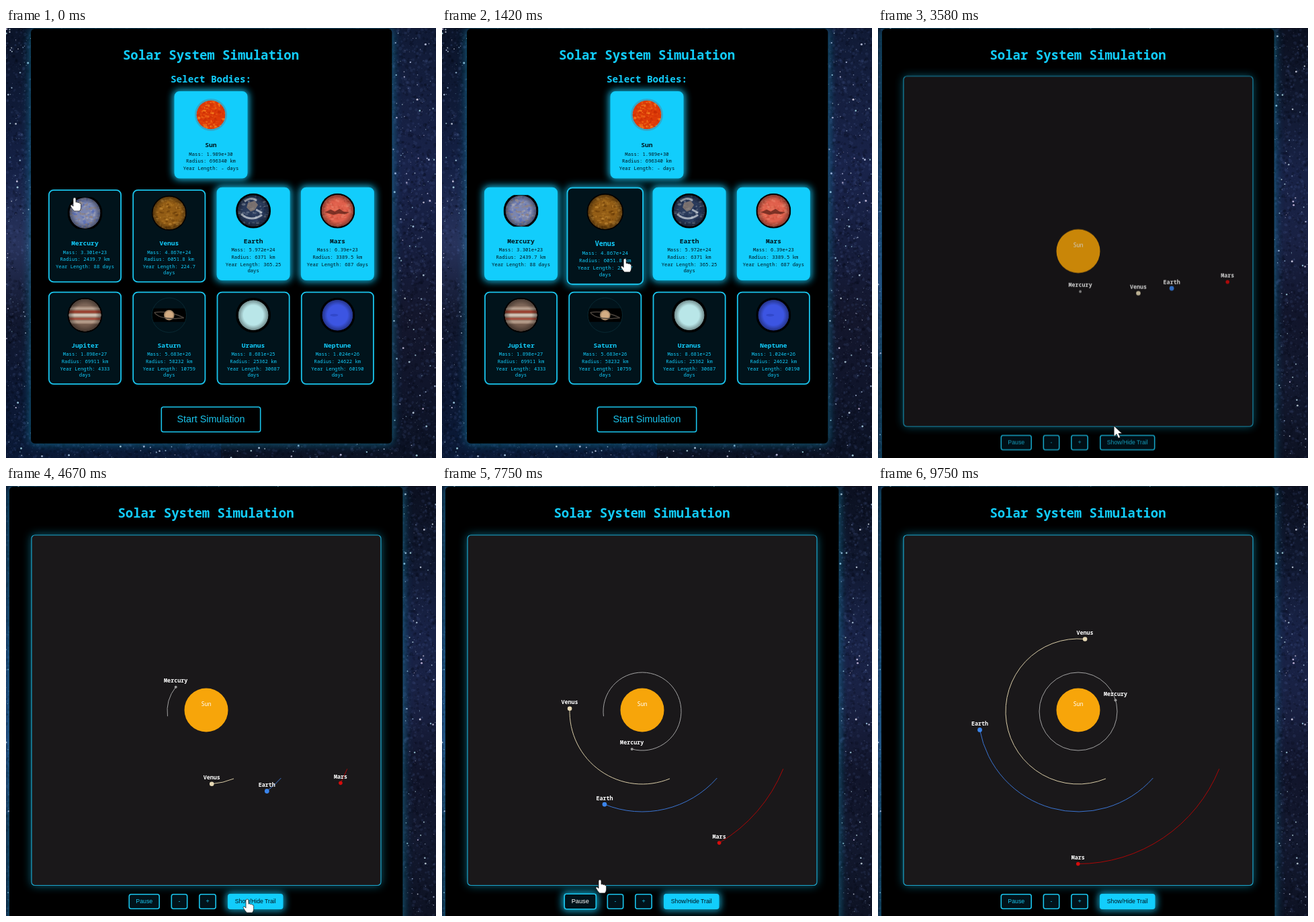
Animation of 640x639 px, one loop 9830 ms. Source, as an HTML page with a canvas:

```html
<!DOCTYPE html>
<html lang="en">
<head>
<meta charset="utf-8">
<title>Solar System Simulation</title>
<style>
html, body { margin: 0; width: 100%; height: 100%; overflow: hidden; background: #000; }
canvas, svg { position: absolute; left: 0; top: 0; width: 640px; height: 639px; display: block; }
text { font-family: 'Noto Sans Mono', 'DejaVu Sans Mono', monospace; text-anchor: middle; }
.b { font-weight: 700; }
.ui { font-family: 'Liberation Sans', Arial, sans-serif; }
</style>
</head>
<body>
<canvas id="skyA" width="640" height="639"></canvas>
<canvas id="skyB" width="640" height="639"></canvas>
<svg id="stage" viewBox="0 0 640 639">
  <defs>
    <filter id="glow" x="-30%" y="-80%" width="160%" height="260%"><feGaussianBlur stdDeviation="5.5"/></filter>
    <filter id="halo" x="-10%" y="-10%" width="120%" height="120%"><feGaussianBlur stdDeviation="7"/></filter>
    <filter id="soft"><feGaussianBlur stdDeviation=".4"/></filter>
    <radialGradient id="shade">
      <stop offset=".65" stop-color="#000" stop-opacity="0"/>
      <stop offset="1" stop-color="#000" stop-opacity=".4"/>
    </radialGradient>
  </defs>
</svg>
<script>
const LOOP = 9830, FPS = 12, CUT = 2870, TRAIL = 4290;
const CYAN = '#12cdfc', LINE = '#1ac4ec', DARK = '#01131b', INK = '#00141c';
const svg = document.getElementById('stage');
const clamp = v => Math.max(0, Math.min(1, v));

function el(parent, tag, attrs = {}, text) {
  const e = document.createElementNS('http://www.w3.org/2000/svg', tag);
  set(e, attrs);
  if (text !== undefined) e.textContent = text;
  parent.appendChild(e);
  return e;
}
function set(e, attrs) { for (const k in attrs) e.setAttribute(k, attrs[k]); }
function label(parent, x, mid, size, text, attrs = {}) {
  return el(parent, 'text', { x, y: mid + size * .35, 'font-size': size, fill: CYAN, ...attrs }, text);
}
function rng(s) {
  return () => {
    s = (s + 0x6D2B79F5) | 0;
    let r = Math.imul(s ^ (s >>> 15), 1 | s);
    r = (r + Math.imul(r ^ (r >>> 7), 61 | r)) ^ r;
    return ((r ^ (r >>> 14)) >>> 0) / 4294967296;
  };
}
function mix(a, b, k) {
  const part = (c, i) => parseInt(c.slice(i, i + 2), 16);
  return 'rgb(' + [1, 3, 5].map(i => Math.round(part(a, i) + (part(b, i) - part(a, i)) * k)) + ')';
}
// Linear interpolation through rows of [time, values...]
function track(keys, t) {
  let i = 1;
  while (i < keys.length - 1 && keys[i][0] < t) i++;
  const a = keys[i - 1], b = keys[i], k = clamp((t - a[0]) / (b[0] - a[0]));
  return a.slice(1).map((v, j) => v + (b[j + 1] - v) * k);
}

// ---- starry sky ----
function sky(id, seed, left, right) {
  const cv = document.getElementById(id), c = cv.getContext('2d'), rand = rng(seed);
  [[left, 0], [right, 320]].forEach(([cols, x]) => {
    const g = c.createLinearGradient(0, 0, 0, 639);
    cols.forEach((col, i) => g.addColorStop(i / (cols.length - 1), col));
    c.fillStyle = g;
    c.fillRect(x, 0, 320, 639);
  });
  for (let i = 0; i < 14000; i++) {
    c.fillStyle = rand() < .55 ? 'rgba(0,4,16,.2)' : 'rgba(90,115,175,.13)';
    c.beginPath();
    c.arc(rand() * 640, rand() * 639, .8 + rand() * 1.8, 0, 7);
    c.fill();
  }
  for (let i = 0; i < 13000; i++) {
    const m = rand(), s = .45 + m ** 25 * 1.1;
    c.fillStyle = `rgba(${170 + rand() * 60 | 0},${200 + rand() * 35 | 0},240,${.08 + m ** 6 * .75})`;
    c.beginPath();
    c.arc(rand() * 640, rand() * 639, s, 0, 7);
    c.fill();
  }
  return cv;
}
const skyA = sky('skyA', 11,
  ['#0b1429', '#0f1a36', '#152146', '#28335c', '#12182f', '#0c1732', '#0a1936'],
  ['#101a35', '#151f40', '#19234a', '#161e3f', '#13162c', '#10152b', '#0b1224']);
const skyB = sky('skyB', 29,
  ['#0c1830', '#14203c', '#1a2e5a', '#24386a', '#14203c', '#0e1a34'],
  ['#0b1020', '#10182f', '#182246', '#192143', '#11152b', '#12182e', '#0d1223']);

// ---- shared parts ----
function frame(parent, o, r, border) {
  const box = { x: o.x + border / 2, y: o.y + border / 2, width: o.w - border, height: o.h - border, rx: r };
  o.glow = el(parent, 'rect', { x: o.x - 2, y: o.y - 2, width: o.w + 4, height: o.h + 4, rx: r + 2,
    fill: CYAN, filter: 'url(#glow)' });
  o.box = el(parent, 'rect', { ...box, stroke: LINE, 'stroke-width': border });
}
function grow(o, k, dy = 0) {
  const cx = o.x + o.w / 2, cy = o.y + o.h / 2;
  o.g.setAttribute('transform', `translate(${cx} ${cy + dy}) scale(${k}) translate(${-cx} ${-cy})`);
}
function panel(parent) {
  const halo = el(parent, 'rect', { fill: '#12b4dc', opacity: .55, filter: 'url(#halo)', rx: 6 });
  const body = el(parent, 'rect', { fill: '#000', rx: 6 });
  return (x, y, width, height) => [halo, body].forEach(e => set(e, { x, y, width, height }));
}
function button(parent, x, y, w, h, text, size, scene, fill) {
  const o = { x, y, w, h, scene, fill, g: el(parent, 'g') };
  frame(o.g, o, 3, 1.6);
  o.text = label(o.g, x + w / 2, y + h / 2 - .3, size, text, { class: 'ui' });
  return o;
}
function paintButton(o, hover, on = 0) {
  set(o.box, { fill: on ? mix(DARK, CYAN, on) : mix(o.fill, DARK, hover), stroke: mix(LINE, CYAN, on) });
  o.glow.setAttribute('opacity', Math.max(hover, on) * .8);
  o.text.setAttribute('fill', on ? mix(CYAN, INK, on) : mix(LINE, '#ffffff', hover));
  grow(o, 1 + .05 * hover * (1 - on));
}

// ---- selection page ----
const menu = el(svg, 'g');
panel(menu)(37, 1, 537.5, 616.5);
label(menu, 305, 40.5, 19, 'Solar System Simulation', { class: 'b' });
label(menu, 305, 76, 14.3, 'Select Bodies:', { class: 'b' });

// name, mass, radius, year, disc radius, image height, base colour, spot colours, selection time
const bodies = [
  ['Sun', '1.989e+30', '696340', '- days', 21.5, 0, '#dc3a08', ['#ff9c2a', '#c42a04', '#f05a10'], -999],
  ['Mercury', '3.301e+23', '2439.7', '88 days', 23, 47, '#7b86b0', ['#b0aeb4', '#4c65b8', '#98806a'], 600],
  ['Venus', '4.867e+24', '6051.8', '224.7 days', 24.5, 52, '#925c15', ['#c98f38', '#643806', '#a8701d'], 1700],
  ['Earth', '5.972e+24', '6371', '365.25 days', 23.5, 52, '#2a3a5a', ['#8793a4', '#35486c', '#17274a'], -999],
  ['Mars', '6.39e+23', '3389.5', '687 days', 24, 52, '#e0604c', ['#ee8b72', '#c24a36', '#e9765c'], -999],
  ['Jupiter', '1.898e+27', '69911', '4333 days', 24, 52, '#a08675', null, 1e9],
  ['Saturn', '5.683e+26', '58232', '10759 days', 8, 20, '#d3ac83', null, 1e9],
  ['Uranus', '8.681e+25', '25362', '30687 days', 22.5, 52, '#b9e6e8', null, 1e9],
  ['Neptune', '1.024e+26', '24622', '60190 days', 23, 52, '#3c55e2', null, 1e9]
];

function portrait(g, i, cx, cy) {
  const [name, , , , r, h, base, spots] = bodies[i], rand = rng(i * 97 + 5);
  const clip = (id, rad) => el(el(svg.querySelector('defs'), 'clipPath', { id }), 'circle', { cx, cy, r: rad });
  clip('img' + i, 26);
  clip('disc' + i, r);
  if (h) el(g, 'rect', { x: cx - 26, y: cy - h / 2, width: 52, height: h, 'clip-path': `url(#img${i})` });
  else el(g, 'circle', { cx, cy, r: 24, fill: '#4e8ea6', opacity: .6, filter: 'url(#soft)' });
  const ring = (attrs) => el(g, 'path', { fill: 'none', stroke: '#4a423b', 'stroke-width': 1.5, ...attrs });
  if (name === 'Saturn') {
    el(g, 'circle', { cx, cy, r: 25.7, fill: 'none', stroke: '#0b2c36', 'stroke-width': .9 });
    ring({ d: `M${cx - 22} ${cy - 4}Q${cx} ${cy - 7} ${cx + 22} ${cy + 4}` });
  }
  const disc = el(g, 'g', { 'clip-path': `url(#disc${i})` });
  el(disc, 'circle', { cx, cy, r, fill: base });
  const art = el(disc, 'g', { filter: 'url(#soft)' });
  if (spots) for (let k = 0; k < 150; k++) {
    const a = rand() * 6.283, d = r * Math.sqrt(rand());
    el(art, 'ellipse', { cx: cx + d * Math.cos(a), cy: cy + d * Math.sin(a), rx: .6 + rand() * 2.4, ry: .5 + rand() * 1.5,
      fill: spots[k % 3], opacity: .25 + rand() * .4 });
  }
  const band = (y, hh, fill) => el(art, 'rect', { x: cx - 26, y: cy + y, width: 52, height: hh, fill });
  if (name === 'Jupiter') {
    band(-24, 11, '#7d6557'); band(-11, 2, '#b9a494'); band(-7, 4, '#9a4433');
    band(-2, 4, '#d0c0b2'); band(4, 3, '#a3503f'); band(9, 2, '#b9a18f'); band(13, 12, '#735a4c');
  }
  if (name === 'Mars') el(art, 'path', { d: `M${cx - 19} ${cy + 2}l9-4 6 3 7-4 6 4 9 1-7 3-9-1-8 2z`, fill: '#5e2218', opacity: .75 });
  if (name === 'Earth') {
    el(art, 'path', { d: `M${cx - 8} ${cy - 12}l10-3 5 6-5 8-6 2-6-6z`, fill: '#9a8877', opacity: .7 });
    el(art, 'path', { d: `M${cx - 18} ${cy + 5}q14 12 31 1M${cx - 13} ${cy - 14}q10-8 18-1M${cx + 4} ${cy - 2}l9 5`,
      fill: 'none', stroke: '#e4e8ec', 'stroke-width': 3, opacity: .65 });
  }
  if (name === 'Neptune') el(art, 'ellipse', { cx: cx - 5, cy, rx: 6, ry: 2, fill: '#2a40bc', opacity: .6 });
  if (i) el(g, 'circle', { cx, cy, r, fill: 'url(#shade)' });
  if (name === 'Saturn') ring({ d: `M${cx - 22} ${cy - 4}Q${cx - 14} ${cy + 8} ${cx + 22} ${cy + 4}` });
}

const cards = bodies.map((b, i) => {
  const col = (i - 1) % 4;
  const o = { x: i ? 63 + 125.3 * col : 250.5, y: i ? (i < 5 ? 240 : 391.7) : 97.3,
    w: 109, h: i ? 138.3 : 129.5, scene: 0, at: b[8], g: el(menu, 'g') };
  frame(o.g, o, 7, 1.8);
  const cx = o.x + o.w / 2;
  portrait(o.g, i, cx, o.y + 35);
  o.info = el(o.g, 'g');
  const line = (dy, text, size = 7.25, attrs = {}) =>
    label(o.info, cx, o.y + dy, size, text, attrs).removeAttribute('fill');
  line(80, b[0], 9.6, { class: 'b' });
  line(93, 'Mass: ' + b[1]);
  line(103.6, `Radius: ${b[2]} km`);
  const year = 'Year Length: ' + b[3];
  if (year.length < 22) line(114.3, year);
  else { line(114.3, year.replace(' days', '')); line(123.6, 'days'); }
  return o;
});
const start = button(menu, 230.5, 562.5, 149, 38.5, 'Start Simulation', 14.3, 0, '#000000');

// ---- simulation page ----
const sim = el(svg, 'g');
const simPanel = panel(sim);
label(sim, 297.5, 40.5, 19, 'Solar System Simulation', { class: 'b' });
const view = el(sim, 'g');
const field = { x: 38, y: 73, width: 520, height: 520.5, rx: 5 };
el(view, 'rect', { ...field, fill: CYAN, opacity: .5, filter: 'url(#halo)' });
el(view, 'rect', { ...field, fill: '#1a181a', stroke: '#1ca4ca', 'stroke-width': 1.2 });

const CX = 298, CY = 335;
// name, orbit, speed relative to Earth, size, colour, trail colour
const planets = [
  ['Mercury', 58, 365.25 / 88, 2, '#9a9a9a', '#a2a2a2'],
  ['Venus', 108, 365.25 / 224.7, 3.3, '#e6d8b4', '#d8cba6'],
  ['Earth', 149, 1, 3.4, '#3b84ea', '#3a74d2'],
  ['Mars', 226.5, 365.25 / 687, 2.8, '#d60c0c', '#ac0606']
].map(([name, orbit, speed, r, fill, stroke]) => ({
  orbit, speed,
  trail: el(view, 'path', { fill: 'none', stroke, 'stroke-width': 1 }),
  dot: el(view, 'circle', { r, fill }),
  tag: label(view, 0, 0, 8.4, name, { fill: '#fff', class: 'b' })
}));
el(view, 'circle', { cx: CX, cy: 333, r: 32.5, fill: '#f7a50a' });
label(view, CX, 323.7, 8.4, 'Sun', { fill: '#fff' });

const pause = button(view, 182.5, 606, 46.5, 23, 'Pause', 8.8, 1, DARK);
const slower = button(view, 245.5, 606, 25, 23, '-', 8.8, 1, DARK);
const faster = button(view, 287, 606, 26, 23, '+', 8.8, 1, DARK);
const trails = button(view, 330, 606, 82.5, 23, 'Show/Hide Trail', 8.7, 1, DARK);

// Earth's angle in degrees; the flat stretch is the pause
const turn = [[2860, 0], [3580, 20.85], [5830, 86.75], [6200, 97.45], [7240, 97.45], [7750, 112.1], [9750, 169.4]];

function paintPlanets(t) {
  const now = track(turn, t)[0], from = track(turn, TRAIL)[0];
  for (const p of planets) {
    const at = deg => {
      const a = deg * p.speed * Math.PI / 180;
      return [CX + p.orbit * Math.cos(a), CY + p.orbit * Math.sin(a)];
    };
    const [x, y] = at(now), r = p.orbit;
    set(p.dot, { cx: x, cy: y });
    set(p.tag, { x, y: y - 6.5 });
    const span = (now - from) * p.speed, arc = `A${r} ${r} 0 `;
    let d = '';
    if (span >= 360) d = `M${CX - r} ${CY}${arc}1 1 ${CX + r} ${CY}${arc}1 1 ${CX - r} ${CY}`;
    else if (span > 0) d = `M${at(from)}${arc}${+(span > 180)} 1 ${x} ${y}`;
    p.trail.setAttribute('d', d);
  }
}

// ---- pointer ----
const hand = el(svg, 'path', { d: 'M-2 2a2 2 0 0 1 4 0v5q2-1 3 .6q2-.8 2.8.8q1.8-.4 1.8 2v4q0 3-2 5.6h-8.2q-3-3-5.4-7.6q0-2 2-1.4l2 2z' });
const arrow = el(svg, 'path', { d: 'M0 0V16l4-3.6l2.6 6l2.8-1.2l-2.6-5.8h5.2z' });
[hand, arrow].forEach(e => set(e, { fill: '#fff', stroke: '#111', 'stroke-width': .7 }));

const path = [
  [0, 102, 252], [300, 112, 285], [750, 118, 300], [1100, 195, 322], [1420, 273, 343], [1650, 264, 328],
  [1900, 260, 335], [2350, 312, 570], [2750, 320, 583], [2950, 321, 584], [3400, 345, 588], [3580, 351, 591],
  [4000, 372, 613], [4600, 372, 614], [5350, 226, 615], [5830, 221, 615], [7300, 217, 616], [7670, 222, 612],
  [7750, 235, 585], [9000, 238, 588], [9250, 320, 330], [9600, 400, -25], [9830, 400, -25]
];
const targets = [...cards, start, pause, slower, faster, trails];

function over(o, t) {
  if (t < 0 || +(t >= CUT) !== o.scene) return false;
  const [x, y] = track(path, t);
  return x > o.x && x < o.x + o.w && y > o.y && y < o.y + o.h;
}
// Share of the last moments spent over an element, giving a short fade in and out
function hover(o, t) {
  let n = 0;
  for (let k = 0; k < 8; k++) n += over(o, t - 90 - k * 32);
  return n / 8;
}

function draw(ms) {
  const t = Math.floor((ms + 5) * FPS / 1000) * 1000 / FPS, inSim = t >= CUT;
  skyA.style.display = menu.style.display = inSim ? 'none' : '';
  skyB.style.display = sim.style.display = inSim ? '' : 'none';
  if (inSim) {
    const p = clamp((t - CUT) / 1000), q = 1 - p;
    simPanel(5 + 3 * q, 1, 585.5 - 6 * q, 680);
    view.setAttribute('opacity', p ** .6);
    view.setAttribute('transform', `translate(0 ${-5 * q})`);
    paintPlanets(t);
    [pause, slower, faster].forEach(b => paintButton(b, hover(b, t)));
    paintButton(trails, hover(trails, t), clamp((t - TRAIL) / 300));
  } else {
    for (const c of cards) {
      const on = clamp((t - c.at) / 300), h = hover(c, t);
      set(c.box, { fill: mix(DARK, CYAN, on), stroke: mix(LINE, CYAN, on) });
      c.glow.setAttribute('opacity', Math.max(on * .9, h * .7));
      c.info.setAttribute('fill', mix(CYAN, INK, on));
      grow(c, 1 + .05 * h * (1 - on), -3.3 * on);
    }
    paintButton(start, hover(start, t));
  }
  const [x, y] = track(path, t), link = targets.some(o => over(o, t) || over(o, t - 90));
  hand.style.display = link ? '' : 'none';
  arrow.style.display = link ? 'none' : '';
  (link ? hand : arrow).setAttribute('transform', `translate(${x} ${y})`);
}

const t0 = performance.now();
function tick() {
  draw((performance.now() - t0) % LOOP);
  requestAnimationFrame(tick);
}
tick();
</script>
</body>
</html>
```
